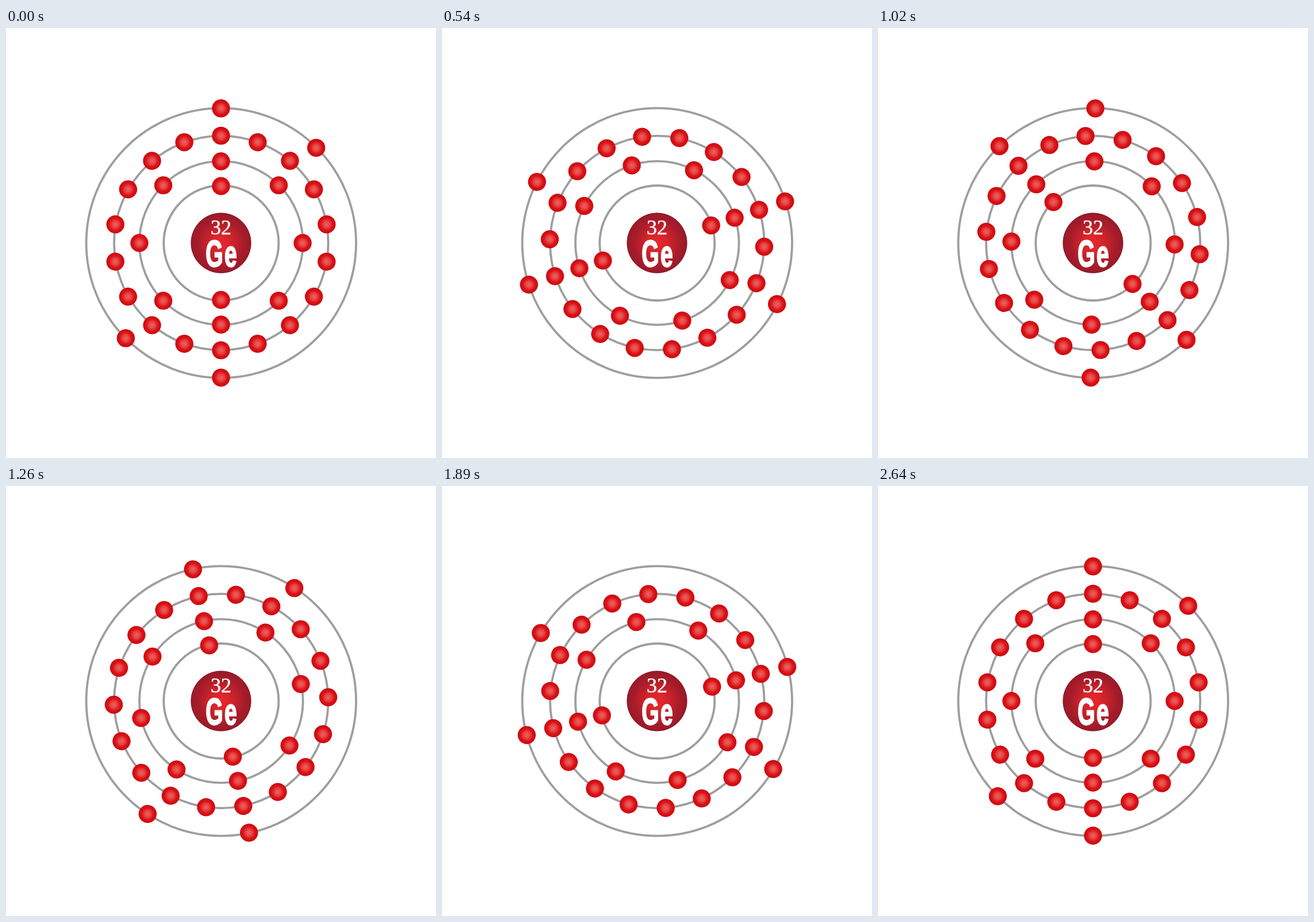
These frames come from a looping animation (748x748 px, 2.67 s). An HTML page:

```html
<!DOCTYPE html>
<html lang="en">
<head>
<meta charset="utf-8">
<title>Electron shells</title>
<style>
  html, body { margin: 0; height: 100%; overflow: hidden; background: #fff; }
  svg { display: block; width: 100vw; height: 100vh; }
  .shell { fill: none; stroke: #9e9e9e; stroke-width: 3.8; }
  .label { fill: #fff; stroke: #fff; }
  .number { font: 36px "Liberation Serif", "Times New Roman", serif; stroke-width: .6; text-anchor: middle; }
  .symbol { font: bold 65px "Liberation Sans", Arial, sans-serif; stroke-width: 2.4; letter-spacing: 4px; }
</style>
</head>
<body>
<svg viewBox="0 0 748 748">
  <defs>
    <radialGradient id="electron">
      <stop offset="0" stop-color="#ee6260"/>
      <stop offset=".35" stop-color="#e64644"/>
      <stop offset=".68" stop-color="#d81218"/>
      <stop offset="1" stop-color="#cf080e"/>
    </radialGradient>
    <radialGradient id="nucleus">
      <stop offset="0" stop-color="#e8282c"/>
      <stop offset=".3" stop-color="#d9252b"/>
      <stop offset=".75" stop-color="#a91c2a"/>
      <stop offset="1" stop-color="#981a29"/>
    </radialGradient>
  </defs>
  <g id="shells" class="shell"></g>
  <g id="electrons" fill="url(#electron)"></g>
  <circle cx="374" cy="374" r="52.5" fill="url(#nucleus)"/>
  <circle cx="374" cy="374" r="51.8" fill="none" stroke="#741320" stroke-dasharray="2 1.5"/>
  <text class="label number" x="374" y="359">32</text>
  <text class="label symbol" transform="translate(347.3 415) scale(.6 1)">Ge</text>
</svg>
<script>
const CENTER = 374, STEP = 30, STEPS = 89, HALF = 45;

const evenly = count => Array.from({ length: count }, (_, i) => i * 360 / count);
const shells = [
  { ring: 100, orbit: 99, angles: evenly(2) },
  { ring: 142.3, orbit: 142, angles: evenly(8) },
  { ring: 186.3, orbit: 186.6, angles: evenly(18) },
  { ring: 234.7, orbit: 234.2, angles: [0, 45, 180, 225] },
];

const electrons = document.getElementById("electrons");

document.getElementById("shells").innerHTML = shells
  .map(({ ring }) => `<circle cx="374.3" cy="374" r="${ring}"/>`).join("");

electrons.innerHTML = shells.flatMap(({ orbit, angles }) => angles.map(angle =>
  `<circle cx="${CENTER}" cy="${CENTER - orbit}" r="15.7" transform="rotate(${angle} ${CENTER} ${CENTER})"/>`
)).join("");

// The second half turn takes slightly fewer steps than the first.
function turn(step) {
  return step < HALF
    ? 180 * step / HALF
    : 180 + 180 * (step - HALF) / (STEPS - 1 - HALF);
}

function draw() {
  const step = Math.floor(performance.now() / STEP) % STEPS;
  electrons.setAttribute("transform", `rotate(${turn(step)} ${CENTER} ${CENTER})`);
  requestAnimationFrame(draw);
}
draw();
</script>
</body>
</html>
```
